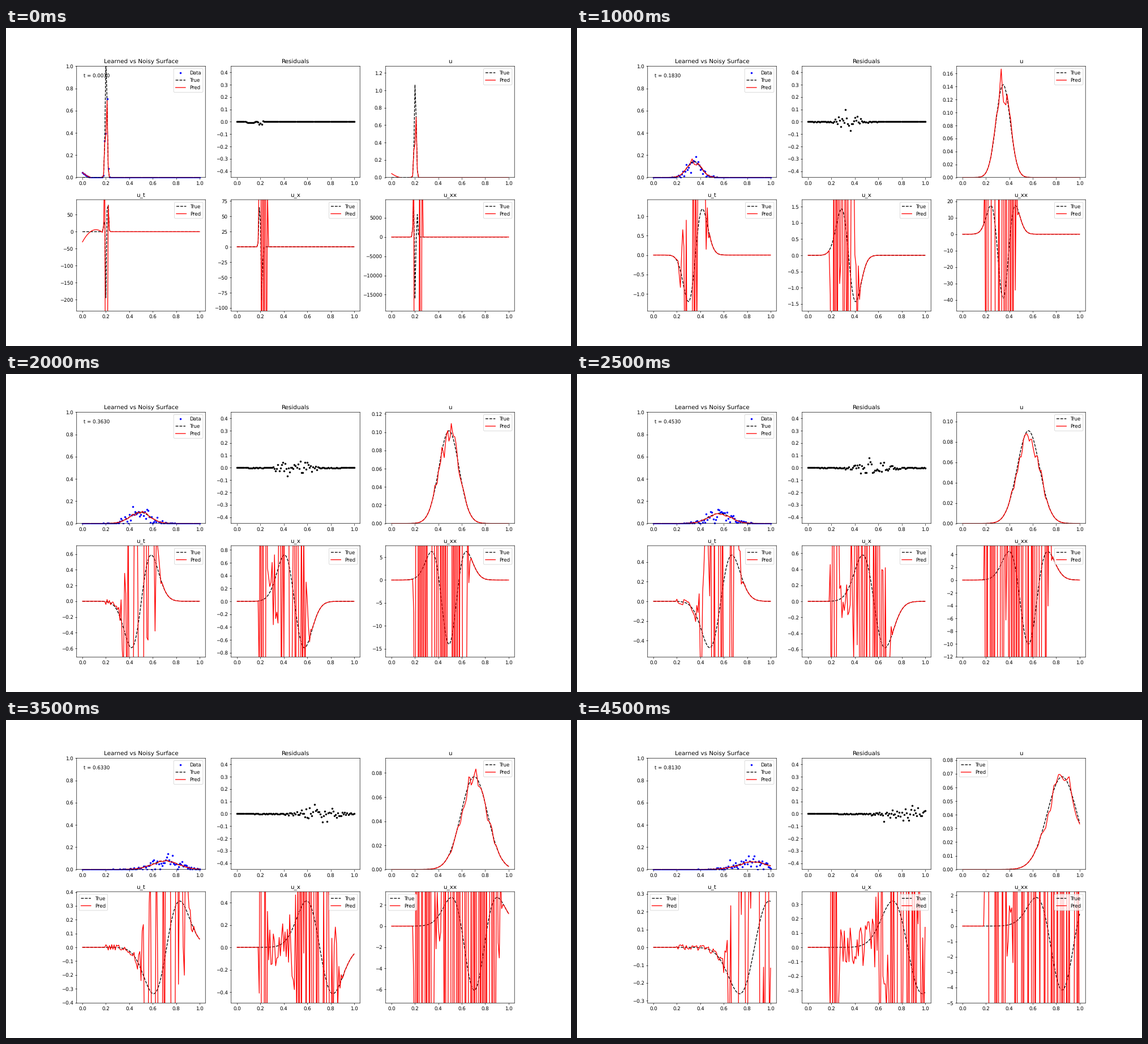
Animation, 998 px wide and 561 px high, one loop 5000 ms. Source, as a matplotlib script:

```python
import numpy as np
import matplotlib.pyplot as plt
from matplotlib.animation import FuncAnimation

# Unsnapped lines and unhinted text keep fractional pixel positions.
plt.rcParams["path.snap"] = False
plt.rcParams["text.hinting"] = "no_hinting"

DPI = 62.375
FRAMES = 10
START, SPEED, DIFF, MASS = 0.2, 0.8, 0.01, 0.0612
X = np.linspace(0, 1, 101)
NAMES = ["u", "u_t", "u_x", "u_xx"]


def plateau(x, width, power=4):
    """Flat-topped bump of height one."""
    return np.exp(-np.abs(x / width) ** power)


def pulse(t):
    """Centre and width of the drifting, spreading hump."""
    return START + SPEED * t, np.sqrt(2 * DIFF * t)


def solution(t):
    c, s = pulse(t)
    d, var = X - c, s ** 2
    u = MASS / np.sqrt(t) * np.exp(-d ** 2 / (2 * var))
    ux = -d / var * u
    uxx = (d ** 2 / var ** 2 - 1 / var) * u
    return {"u": u, "u_t": DIFF * uxx - SPEED * ux, "u_x": ux, "u_xx": uxx}


def startup(name, t):
    """Misfit near the left edge, gone soon after the start."""
    fade = np.exp(-(t - 0.003) / 0.015)
    bend = ((X - 0.115) / 0.115) ** 2
    shape = {"u": 0.053 * bend - 0.008, "u_t": 6 - 36 * bend}.get(name, 0 * X)
    return fade * shape * (X < 0.175)


def gain(name, t):
    """Size of the derivative error, in units of the true peak."""
    c, s = pulse(t)
    z = (X - c) / s
    behind = (X > 0.195) & (z < -1.5)
    origin = 7 * plateau(X - 0.225, 0.033, 8) * (X > 0.185)
    if name == "u_t":
        return 4 * plateau(z, 1.5) + 0.05 * behind
    if name == "u_x":
        return 4 * plateau(z + 0.35, 1.45) * (X > 0.19) + origin + 0.35 * behind
    gap = 1 - 0.95 * plateau(X - 0.4, 0.05) * (z < -1.8)
    ahead = np.where(z > 0, plateau(z, 1.75, 8), 1)
    return 7 * ahead * gap * (X > 0.195) + origin


def zigzag(rng, flip):
    """Random heights whose sign flips with the given chance per step."""
    signs = np.cumprod(np.where(rng.random(101) < flip, -1, 1))
    return signs * rng.uniform(0.3, 1.3, 101)


def ripple(rng, step):
    knots = np.arange(0, 1 + step, step)
    return np.interp(X, knots, rng.standard_normal(len(knots)))


def predict(name, t, true, rng):
    c, s = pulse(t)
    if name == "u":
        wobble = 0.11 * ripple(rng, 0.01 + 0.015 * t) * plateau((X - c) / s, 1.9)
        dip = 0.68 * plateau(X - START, 0.004, 2) * np.exp(-t / 0.05)
        return true * (1 + wobble * (t > 0.05) - dip) + startup(name, t)
    flip = {"u_t": 0.4, "u_x": 0.6, "u_xx": 0.65}[name]
    error = gain(name, t) * zigzag(rng, flip) * np.abs(true).max()
    return true + error + startup(name, t)


def measure(true, pred, rng):
    noise = 0.036 * (true / true.max()) ** 0.6 * rng.standard_normal(101)
    return np.maximum(pred - noise, 0)


def legend_place(name, t):
    """Move the legend away from the crest once it nears the right edge."""
    c, s = pulse(t)
    if name == "u":
        return "upper left" if c > 0.75 else "upper right"
    if name == "u_t":
        return "upper left" if c + s > 0.7 else "upper right"
    crest = c + np.sqrt(3) * s
    if name == "u_xx" and 0.75 < crest < 1:
        return "upper left" if crest < 0.95 else "lower left"
    return "upper right"


def add_curves(ax, true, pred):
    ax.plot(X, true, "k--", label="True")
    ax.plot(X, pred, "r", label="Pred")


fig, axes = plt.subplots(2, 3, figsize=(16, (561 + 1e-6) / DPI), dpi=DPI)
surface, resid, *panels = axes.flat


def draw(frame):
    t = 0.003 + 0.09 * frame
    true = solution(t)
    pred = {name: predict(name, t, true[name], np.random.default_rng([frame, k]))
            for k, name in enumerate(NAMES)}
    data = measure(true["u"], pred["u"], np.random.default_rng([frame, 9]))
    for ax in axes.flat:
        ax.clear()

    surface.plot(X, data, "b.", label="Data")
    add_curves(surface, true["u"], pred["u"])
    surface.text(0.01, 0.9, f"t = {t:.4f}")
    surface.set(title="Learned vs Noisy Surface", ylim=(0, 1))
    surface.legend(loc="upper right")

    resid.plot(X, pred["u"] - data, "k.")
    resid.set(title="Residuals", ylim=(-0.45, 0.45))

    for ax, name in zip(panels, NAMES):
        y = true[name]
        add_curves(ax, y, pred[name])
        low = 0 if name == "u" else 1.2 * y.min()
        ax.set(title=name, ylim=(low, 1.2 * y.max()))
        ax.legend(loc=legend_place(name, t))
    for ax in axes.flat:
        ax.set_xlim(-0.05, 1.05)
    return []


anim = FuncAnimation(fig, draw, frames=FRAMES, interval=500, repeat=True,
                     init_func=lambda: draw(0), blit=False)
plt.show()
```
